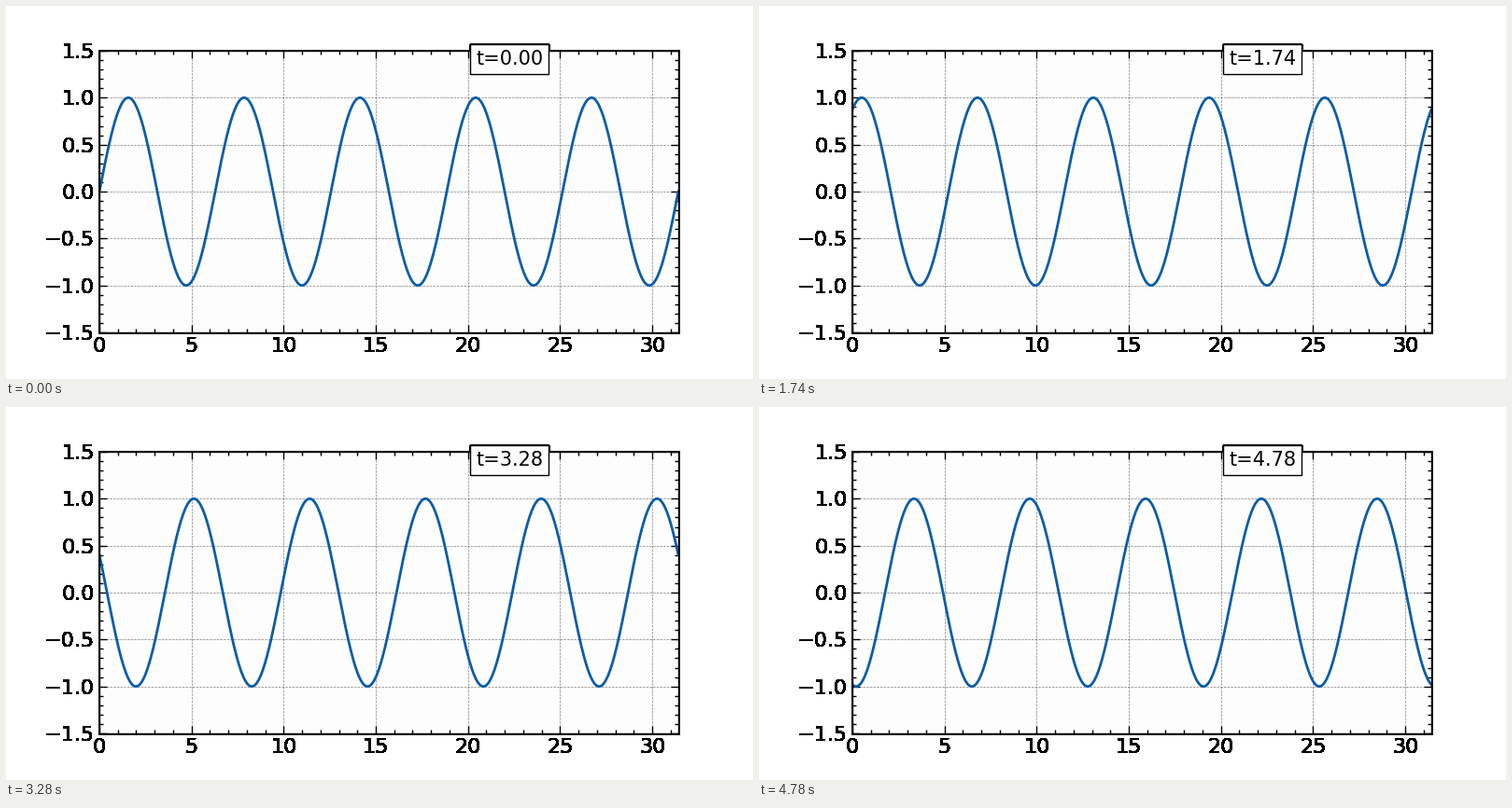
A matplotlib script that plays this animation: 800 px wide and 400 px high, repeating every 4.8 s.

```python
import matplotlib.pyplot as plt
import numpy as np
from matplotlib import markers
from matplotlib.animation import FuncAnimation

FRAMES, INTERVAL = 240, 20
SPEED = 3
X_MAX, Y_MAX = 10 * np.pi, 1.5
PAPER = "#fdfdfd"

plt.rcParams.update({"font.family": "DejaVu Sans", "font.size": 16})


def harden(img, dpi):
    """Make every touched pixel opaque, which gives crisp edges off the axes."""
    img[..., 3] = img[..., 3] > 0.02
    return img, 0, 0


def minor_ticks(x, y, transform, marker):
    ax.plot(x, y, ls="none", marker=marker, ms=3, mew=1, color="black",
            transform=transform, zorder=1.5, clip_on=False)


fig = plt.figure(figsize=(8, 4), dpi=100, facecolor="white")
ax = fig.add_axes([0.125, 0.125, 0.775, 0.755], facecolor=PAPER)
ax.set_agg_filter(harden)
ax.set(xlim=(0, X_MAX), ylim=(-Y_MAX, Y_MAX),
       xticks=np.arange(0, 31, 5), yticks=np.arange(-1.5, 1.6, 0.5))
ax.tick_params(direction="in", length=6, width=1, pad=3.5, top=True, right=True)
ax.grid(color="black", alpha=0.5, ls="--", lw=0.5)
for spine in ax.spines.values():
    spine.set_linewidth(1)

xs = np.array([i for i in range(32) if i % 5])
ys = np.array([i / 10 for i in range(-15, 16) if i % 5])
for edge, x_mark, y_mark in ((0, markers.TICKUP, markers.TICKRIGHT),
                             (1, markers.TICKDOWN, markers.TICKLEFT)):
    minor_ticks(xs, np.full(len(xs), edge), ax.get_xaxis_transform(), x_mark)
    minor_ticks(np.full(len(ys), edge), ys, ax.get_yaxis_transform(), y_mark)
ax.set(xlim=(0, X_MAX), ylim=(-Y_MAX, Y_MAX))

x = np.linspace(0, X_MAX, 1000)
wave, = ax.plot(x, np.sin(x), color="#0C5DA5", lw=2)
clock = ax.text(0.65, 0.95, "t=0.00", transform=ax.transAxes, fontsize=15,
                bbox=dict(facecolor=PAPER, edgecolor="black", linewidth=1))


def update(frame):
    t = frame * INTERVAL / 1000
    wave.set_ydata(np.sin(x - SPEED * t))
    clock.set_text(f"t={t:.2f}")
    return wave, clock


anim = FuncAnimation(fig, update, frames=FRAMES, interval=INTERVAL,
                     repeat=True, repeat_delay=0)
plt.show()
```
